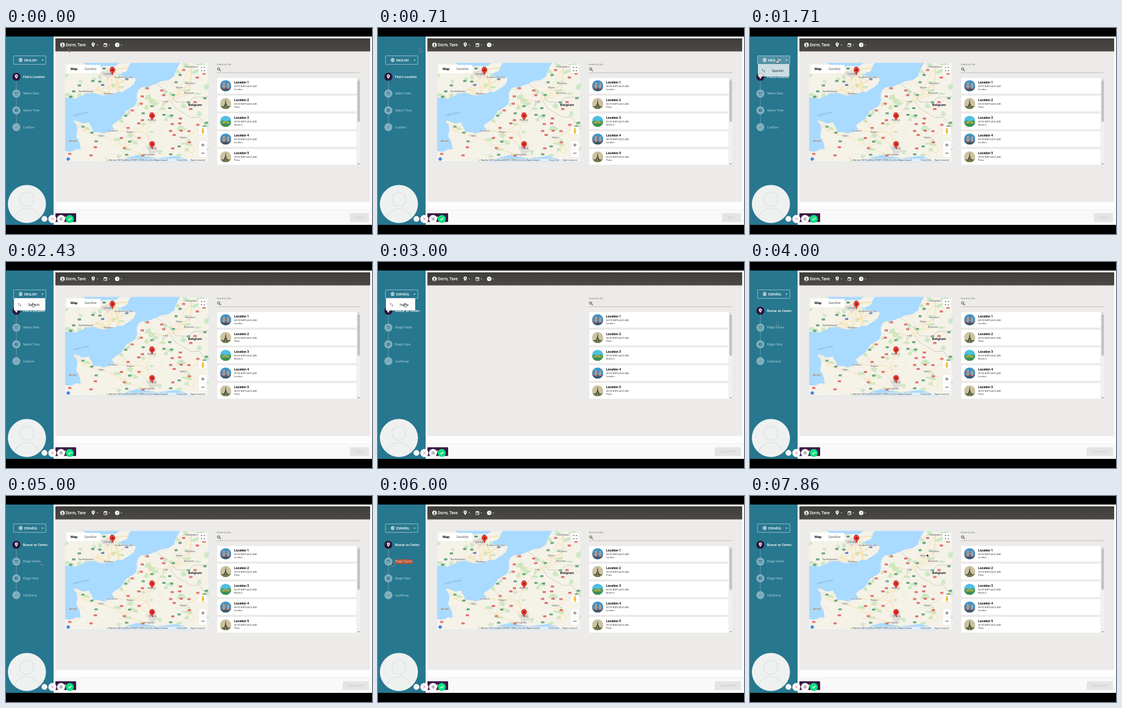
An HTML page that plays this animation: 600x338 px, repeating every 8000 ms.

```html
<!DOCTYPE html>
<html lang="en">
<head>
<meta charset="utf-8">
<style>
html, body { margin: 0; width: 100%; height: 100%; overflow: hidden; background: #000; }
svg { display: block; width: 100vw; height: 100vh; font-family: Roboto, Arial, sans-serif; }
</style>
</head>
<body>
<svg id="stage" viewBox="0 0 600 338"></svg>
<script>
const text = (x, y, size, str, attrs = '') => `<text x="${x}" y="${y}" font-size="${size}" ${attrs}>${str}</text>`;
const rect = (x, y, w, h, fill, attrs = '') => `<rect x="${x}" y="${y}" width="${w}" height="${h}" fill="${fill}" ${attrs}/>`;
const circle = (x, y, r, fill, attrs = '') => `<circle cx="${x}" cy="${y}" r="${r}" fill="${fill}" ${attrs}/>`;
const path = (d, fill, attrs = '') => `<path d="${d}" fill="${fill}" ${attrs}/>`;
const line = (d, color, width, attrs = '') => path(d, 'none', `stroke="${color}" stroke-width="${width}" ${attrs}`);
const at = (x, y, body, scale = 1) => `<g transform="translate(${x} ${y}) scale(${scale})">${body}</g>`;
const repeat = (n, make) => Array.from({ length: n }, (_, i) => make(i)).join('');
const bold = 'font-weight="700"', medium = 'font-weight="500"', middle = 'text-anchor="middle"';

let seed = 11;
const rnd = () => (seed = seed * 16807 % 2147483647) / 2147483647;
const between = (a, b) => a + rnd() * (b - a);

// Icons, centred on the origin
const pinIcon = color => path('M0 4.2C-1.5 2-3-.3-3-1.4a3 3 0 0 1 6 0C3-.3 1.5 2 0 4.2ZM0-2.5a1.1 1.1 0 1 0 .01 0Z', color, 'fill-rule="evenodd"');
const calendarIcon = color => rect(-2.8, -2.6, 5.6, 5.7, 'none', `rx=".5" stroke="${color}" stroke-width=".8"`) +
  rect(-2.8, -2.6, 5.6, 1.7, color) + rect(-1.9, -3.6, .8, 1.2, color) + rect(1.1, -3.6, .8, 1.2, color) + rect(.3, .4, 1.6, 1.6, color);
const clockIcon = (color, hands) => circle(0, 0, 3.6, color) + line('M0-2.2V.2L1.6 1.2', hands, .8);
const tick = (color, w = 1) => line('M-2.5 0L-.8 1.8 2.6-1.8', color, w);
const globe = circle(0, 0, 2.9, 'none', 'stroke="#fff" stroke-width=".6"') +
  line('M-2.9 0H2.9M0-2.9V2.9M-2.4-1.5H2.4M-2.4 1.5H2.4M0-2.9Q-2.8 0 0 2.9Q2.8 0 0-2.9', '#fff', .45);
const caret = (color = '#fff') => path('M-1.5-.8H1.5L0 .9Z', color);

// Map: coasts grow from a few key points by midpoint displacement
function coast(points) {
  let pts = points.split(' ').map(p => p.split(',').map(Number));
  for (let round = 0; round < 3; round++)
    pts = pts.flatMap(([x, y], i) => {
      const [u, v] = pts[(i + 1) % pts.length], bend = between(-.12, .12);
      return [[x, y], [(x + u) / 2 + (v - y) * bend, (y + v) / 2 - (u - x) * bend]];
    });
  return 'M' + pts.map(p => p.map(n => n.toFixed(1)).join(' ')).join('L') + 'Z';
}
const LAND = coast('90,50 208,50 198,70 186,77 212,82 209,93 193,104 165,110 134,107 116,115 90,117') +
  coast('340,50 289,50 276,79 235,96 217,101 213,125 190,147 173,160 178,168 142,171 136,155 111,151 116,180 123,199 90,205 90,230 340,230');
const LABELS = 'London,168,77 Southampton,131,105 Brighton,168,109 Rotterdam,304,65 Antwerp,302,92 Brussels,300,108 Ghent,284,99 Lille,262,122 Amiens,239,152 Rouen,204,172 Caen,156,178 Reims,291,181 Paris,241,199 Versailles,235,209'
  .split(' ').map(s => s.split(',')).map(([name, x, y]) => [name, +x, +y]);

function blob(x, y, rx, ry) {
  return 'M' + Array.from({ length: 12 }, (_, i) => {
    const a = i * Math.PI / 6, r = between(.5, 1.2);
    return (x + rx * r * Math.cos(a)).toFixed(1) + ' ' + (y + ry * r * Math.sin(a)).toFixed(1);
  }).join('L') + 'Z';
}

function roads() {
  const minor = repeat(130, () => `M${between(97, 332)} ${between(57, 219)}q${between(-9, 9)} ${between(-9, 9)} ${between(-20, 20)} ${between(-14, 14)}`);
  const hubs = LABELS.map(l => l.slice(1));
  for (let i = 0; i < 18; i++) hubs.push([between(97, 335), between(57, 222)]);
  let major = '';
  hubs.forEach(([x, y], i) => hubs.slice(i + 1).forEach(([u, v]) => {
    if (Math.hypot(x - u, y - v) < 46)
      major += `M${x} ${y}Q${(x + u) / 2 + between(-6, 6)} ${(y + v) / 2 + between(-6, 6)} ${u} ${v}`;
  }));
  return line(minor, '#e6dfcc', .4) + line(major, '#f8d98c', .65);
}

function badges() {
  const land = new Path2D(LAND), ctx = document.createElement('canvas').getContext('2d');
  const used = LABELS.map(([, x, y]) => [x, y - 1]);
  let out = '';
  for (let i = 0; i < 400 && used.length < 78; i++) {
    const x = between(100, 329), y = between(59, 212);
    const dry = [-4, 4].every(dx => ctx.isPointInPath(land, x + dx, y));
    if (!dry || used.some(([u, v]) => Math.abs(u - x) < 9 && Math.abs(v - y) < 5)) continue;
    used.push([x, y]);
    const english = x < 214 && y < 118, main = rnd() < .65;
    const color = english ? (main ? '#4f9468' : '#5a7cc2') : (main ? '#dc5f58' : '#549d6b');
    const name = (english === main ? 'A' : 'E') + Math.floor(between(2, 48));
    out += at(x.toFixed(1), y.toFixed(1), rect(-2.6, -1.5, 5.2, 3, color, 'rx=".5"') + text(0, .85, 2.4, name, `fill="#fff" ${middle}`));
  }
  return out;
}

const marker = (x, y) => at(x, y,
  path('M0 0C-.6-4-4.5-5-4.5-8.2a4.5 4.5 0 0 1 9 0C4.5-5 .6-4 0 0Z', '#e8392f', 'stroke="#a9201a" stroke-width=".4"') + circle(0, -8, 1.5, '#7d1512'));
const control = (y, h) => rect(316, y, 13.5, h, '#fff', 'rx=".7" stroke="#ccc" stroke-width=".3"');

const map = `<g id="map" clip-path="url(#mapBox)">
  ${rect(97, 57, 236, 163, '#a9daff')}
  ${path(LAND, '#f5f2e8')}
  <g clip-path="url(#land)">${path(repeat(85, () => blob(between(97, 332), between(57, 219), between(2, 8), between(2, 5))), '#cbe8c3')}${roads()}
  ${path(LABELS.map(([, x, y]) => blob(x, y - 1, 4, 3)).join('') + blob(167, 75, 11, 7) + blob(241, 198, 11, 8), '#e0ddd6')}
  ${line('M332 113L307 114 300 122 278 121 271 110 247 92M332 166L317 146 304 147 278 132 271 121', '#a9a6a0', .5)}</g>
  ${badges()}
  <g fill="#444" stroke="#fff" stroke-width=".6" paint-order="stroke" ${middle}>
  ${LABELS.map(([s, x, y]) => text(x, y, /London|Paris/.test(s) ? 5 : 4.2, s)).join('')}
  ${text(193, 82, 4, 'Southend-on-Sea')}${text(175, 170, 4.2, 'Le Havre')}${text(109, 186.5, 4.8, 'Jersey')}
  ${text(310, 128, 6.2, 'Belgium', bold + ' fill="#222"')}</g>
  ${text(123, 142, 3.8, 'English Channel', `fill="#6d9fc9" font-style="italic" ${middle} transform="rotate(-12 123 142)"`)}
  ${marker(174.5, 77)}${marker(239.5, 152)}${marker(239.5, 198.5)}
  ${rect(100, 60.5, 55, 13.5, '#fff', 'rx=".7"')}
  ${text(106, 69.3, 5.6, 'Map', bold)}${text(128.5, 69.3, 5.6, 'Satellite', 'fill="#666"')}
  ${control(60.5, 13.5)}${line('M320 66V64.5H321.7M324 64.5H325.7V66M325.7 69V70.5H324M321.7 70.5H320V69', '#555', .9)}
  ${control(162, 13.5)}${circle(322.8, 165.5, 1.6, '#f4b51f')}${path('M320.6 167.4H325L324.4 171H323.8V174H321.8V171H321.2Z', '#f4b51f')}
  ${control(185, 27)}${line('M320 192H325.6M322.8 189.2V194.8M320 205.3H325.6', '#555', 1)}${line('M318 198.5H328', '#ddd', .5)}
  ${rect(168, 214.5, 165, 5, '#f5f5f5', 'opacity=".75"')}
  <g fill="#444">${text(169, 218.2, 2.85, 'Map data ©2019 LandGrund-XY/QRT (©2009), Terrin, Serv. Mapas Comarcal')}
  ${text(280, 218.2, 2.85, 'Terms of Use')}${text(303, 218.2, 2.85, 'Report a map error')}</g>
  ${circle(102, 215, 2.8, '#4285f4')}</g>`;

// Location list
const PHOTOS = {
  London: rect(-9, -9, 18, 18, '#3d92c8') + rect(-9, 3, 18, 6, '#35566f') + path('M-5 5V-4L-3-6-1-4V5ZM2 5V-3L4-5 6-3V5Z', '#a3a09b') + line('M-9 1Q-6 1-4-3M-1-2H3M-9 4H9', '#b9584f', 1),
  Paris: rect(-9, -9, 18, 18, '#cbc3a0') + rect(-9, 4, 18, 5, '#75804f') + path('M0-8L1 0 4 6H2L0 2-2 6H-4L-1 0Z', '#4f473b'),
  Amiens: rect(-9, -9, 18, 18, '#4fbfe0') + rect(-9, 1, 18, 8, '#2b9a90') + path('M-9 2L-5-2 0 1 5-2 9 1V4H-9Z', '#5f9a45') + path('M-6 3L-3 0 0 3 3 0 6 3Z', '#e0a845') + path('M-9 6Q0 2 9 7V9H-9Z', '#3f8f45')
};
const card = (city, i) => at(345.7, 81.5 + i * 29.15,
  rect(0, 0, 229.5, 26.6, '#fff', 'rx="1.5" stroke="#dedcda" stroke-width=".4"') +
  at(14.4, 13.3, `<g clip-path="url(#round)">${PHOTOS[city]}</g>`) +
  text(28.2, 9.2, 5.15, `Location ${i + 1}`, bold) +
  text(28.2, 15.4, 3.95, '5678 NOPLACE AVE.', 'fill="#333" letter-spacing=".15"') + text(28.2, 20.2, 3.95, city, 'fill="#333" letter-spacing=".1"'));

const list = `${text(345.5, 61, 3.75, 'Search by City', 'fill="#777"')}
  ${circle(348.6, 67.2, 1.9, 'none', 'stroke="#222" stroke-width=".8"')}${line('M350 68.6L352.3 71', '#222', 1)}${line('M345.5 73.3H581', '#999', .5)}
  <g clip-path="url(#listBox)">${['London', 'Paris', 'Amiens', 'London', 'Paris'].map(card).join('')}</g>
  ${rect(576, 81, 4.6, 144, '#f1f1f1')}${rect(576.3, 86, 4, 67.5, '#c1c1c1')}
  ${at(578.3, 83.6, path('M-1.2.6H1.2L0-.8Z', '#888'))}${at(578.3, 222.9, path('M-1.4-.7H1.4L0 .9Z', '#444'))}`;

// Sidebar
const stepY = i => 80 + 27.55 * i;
const stepIcons = [pinIcon('#fff'), calendarIcon('#3f8197'), clockIcon('#3f8197', '#84b0be'), tick('#3f8197')];
const steps = line('M17 80V163', '#7fabb9', .7) +
  stepIcons.map((icon, i) => at(17, stepY(i), circle(0, 0, 6.6, i ? '#84b0be' : '#2d1438') + at(0, 0, icon, .85))).join('') +
  rect(28, 104, 28.5, 7.4, '#c4512f', 'id="selection"') +
  repeat(4, i => text(28, stepY(i) + 1.9, 5.2, '', `class="step" fill="${i ? '#b0d0da' : '#fff'}" ${i ? '' : medium}`));

const sidebar = `${rect(0, 14, 78, 309, '#27778f')}
  ${rect(12.3, 45.7, 53, 14, '#fff', 'id="hover" rx=".8"')}
  ${rect(12.3, 45.7, 53, 14, 'none', 'rx=".8" stroke="#d5e6eb" stroke-width=".6"')}
  ${at(24, 52.6, globe)}${text(30, 54.5, 5, '', `id="language" fill="#fff" ${medium}`)}${at(60, 52.8, caret())}
  ${steps}
  <g id="menu">${rect(13, 60.2, 51.5, 20, '#00252f', 'id="menuShadow" rx="1" opacity=".25"')}
  ${rect(13, 59.5, 51.5, 20, '#fdfdfd', 'id="menuBox" rx=".8"')}
  ${line('M20.7 71V67.5L19.5 68.7M20.7 67.5L21.9 68.7M23.5 69V72.5L22.3 71.3M23.5 72.5L24.7 71.3', '#555', .6)}
  ${text(36, 71.6, 5.3, '', 'id="option" fill="#222"')}</g>`;

const header = rect(81, 17, 516, 22, '#8a8986', 'opacity=".5"') + rect(81, 17, 516, 21.2, 'url(#bar)') +
  at(92.6, 27.7, circle(0, 0, 3.7, '#fff') + circle(0, -1, 1.2, '#444') + path('M-2.3 1.8Q0-.4 2.3 1.8Q0 3.7-2.3 1.8Z', '#444')) +
  text(98, 30, 6.6, 'Dorm, Tave', `fill="#fff" ${medium}`) +
  at(143, 27.6, pinIcon('#fff'), .9) + at(163, 27.9, calendarIcon('#fff'), .9) + at(182.3, 27.7, clockIcon('#fff', '#444')) +
  repeat(3, i => at(149.8 + 19.6 * i, 28, caret('#ddd'), .8));

const footer = rect(78, 298, 522, 25, '#faf9f9') + line('M78 298H600', '#e8e8e8', .6) +
  rect(81, 304, 34, 14.3, '#3c1a47', 'rx=".8"') + text(86, 313, 5, 'BACK', `fill="#fff" ${medium}`) +
  rect(564, 304, 31, 14.3, '#e4e4e4', 'id="nextBox" rx=".8"') + text(579.5, 313, 5, '', `id="next" fill="#cfcfcf" ${middle} ${medium}`);

const recorder = circle(34.3, 288.7, 30.8, '#eff1f1', 'stroke="#fbfcfc" stroke-width=".8"') +
  `<g clip-path="url(#avatar)">${circle(34.3, 281, 11.5, 'none', 'stroke="#dcdfe0" stroke-width="1.2"')}
  ${line('M13 319C13 289 55 289 55.6 319', '#dcdfe0', 1.2)}</g>` +
  circle(63, 313.3, 4.7, '#fff') + line('M61.6 313.3H64.4', '#bbb', .6) +
  [76, 90.2].map(x => circle(x, 313.3, 6.6, '#fff')).join('') +
  line('M74 311.3L78 315.3M78 311.3L74 315.3', '#ee5a7c', .8) + line('M89 310.8V315.8M91.5 310.8V315.8', '#444', .9) +
  circle(104.6, 313.3, 6.5, '#0be37f') + at(104.6, 313.3, tick('#fff', 1.1));

const arrow = path('M0 0V5L1.2 4 2 5.9 2.9 5.5 2.1 3.7H3.6Z', '#111', 'id="arrow" stroke="#fff" stroke-width=".4"');
const hand = path('M-.5.1Q.1-.7.7.1V2.2L3.2 2.8Q3.6 4.6 2.6 6H-.3L-2 3.7Q-1.6 2.9-.5 3.6Z', '#fff', 'id="hand" stroke="#111" stroke-width=".6"');

const $ = id => document.getElementById(id);
$('stage').innerHTML = `<defs>
  <linearGradient id="bar" x2="0" y2="1"><stop stop-color="#3f3e3b"/><stop offset="1" stop-color="#4a4945"/></linearGradient>
  <clipPath id="mapBox">${rect(97, 57.3, 235.3, 162.2, '#000')}</clipPath><clipPath id="land">${path(LAND, '#000')}</clipPath>
  <clipPath id="listBox">${rect(345, 81, 231, 144.3, '#000')}</clipPath><clipPath id="round">${circle(0, 0, 9.2, '#000')}</clipPath>
  <clipPath id="avatar">${circle(34.3, 288.7, 30.5, '#000')}</clipPath></defs>
  ${rect(0, 0, 600, 338, '#000')}${rect(78, 14, 522, 309, '#fdfdfd')}${rect(81, 38, 516, 247.3, '#ecebe9')}
  ${header}${map}${list}${footer}${sidebar}${recorder}<g id="cursor">${arrow}${hand}</g>`;

// Timeline, in steps of a seventh of a second
const STEPS = 56, LOOP = 8000;
const START = [102.5, 34.5];
const MOVES = [
  { from: 1, to: 5, x: 68.5, y: 33.5 },
  { from: 5, to: 9, x: 44, y: 51.5 },
  { from: 12, to: 15, x: 44, y: 67.5 },
  { from: 22, to: 28, x: 44, y: 98.5 },
  { from: 28, to: 32, x: 57, y: 108 },
  { from: 35, to: 41, x: 23, y: 109.5 },
  { from: 46, to: 49, x: 60, y: 104 },
  { from: 51, to: 55, x: 290, y: 95 }
];
const WORDS = {
  en: { language: 'ENGLISH', option: 'Spanish', next: 'NEXT', steps: ['Find a Location', 'Select Date', 'Select Time', 'Confirm'] },
  es: { language: 'ESPAÑOL', option: 'Inglés', next: 'SIGUIENTE', steps: ['Buscar un Centro', 'Elegir Fecha', 'Elegir Hora', 'Confirmar'] }
};
const ramp = (k, a, b) => Math.max(0, Math.min(1, (k - a) / (b - a)));
const set = (id, attrs) => Object.entries(attrs).forEach(([k, v]) => $(id).setAttribute(k, v));

function cursorAt(k) {
  return MOVES.reduce(([x, y], m) => {
    const p = ramp(k, m.from, m.to), e = p * p * (3 - 2 * p);
    return [x + (m.x - x) * e, y + (m.y - y) * e];
  }, START);
}

function draw(k) {
  const spanish = k >= 19, words = spanish ? WORDS.es : WORDS.en;
  for (const id of ['language', 'option', 'next']) $(id).textContent = words[id];
  document.querySelectorAll('.step').forEach((el, i) => el.textContent = words.steps[i]);
  for (const id of ['menuBox', 'menuShadow']) set(id, { width: spanish ? 48 : 51.5 });
  const width = spanish ? 43 : 31;
  set('nextBox', { x: 595 - width, width });
  set('next', { x: 595 - width / 2 });
  set('menu', { opacity: ramp(k, 10, 12.6) * (1 - ramp(k, 21, 23)) });
  set('hover', { opacity: k >= 9 && k < 14 ? .2 : 0 });
  set('map', { opacity: k >= 19 && k < 24 ? 0 : 1 });
  const span = k < 49 ? 28.5 * ramp(k, 35, 41) : 0;
  set('selection', { x: 56.5 - span, width: span });
  const [x, y] = cursorAt(k), pointing = k >= 9 && k < 24;
  set('cursor', { transform: `translate(${x} ${y})` });
  set('arrow', { opacity: pointing ? 0 : 1 });
  set('hand', { opacity: pointing ? 1 : 0 });
}

let shown = -1;
function frame() {
  const k = Math.floor((performance.now() % LOOP + 6) / LOOP * STEPS) % STEPS;
  if (k !== shown) draw(shown = k);
  requestAnimationFrame(frame);
}
frame();
</script>
</body>
</html>
```
